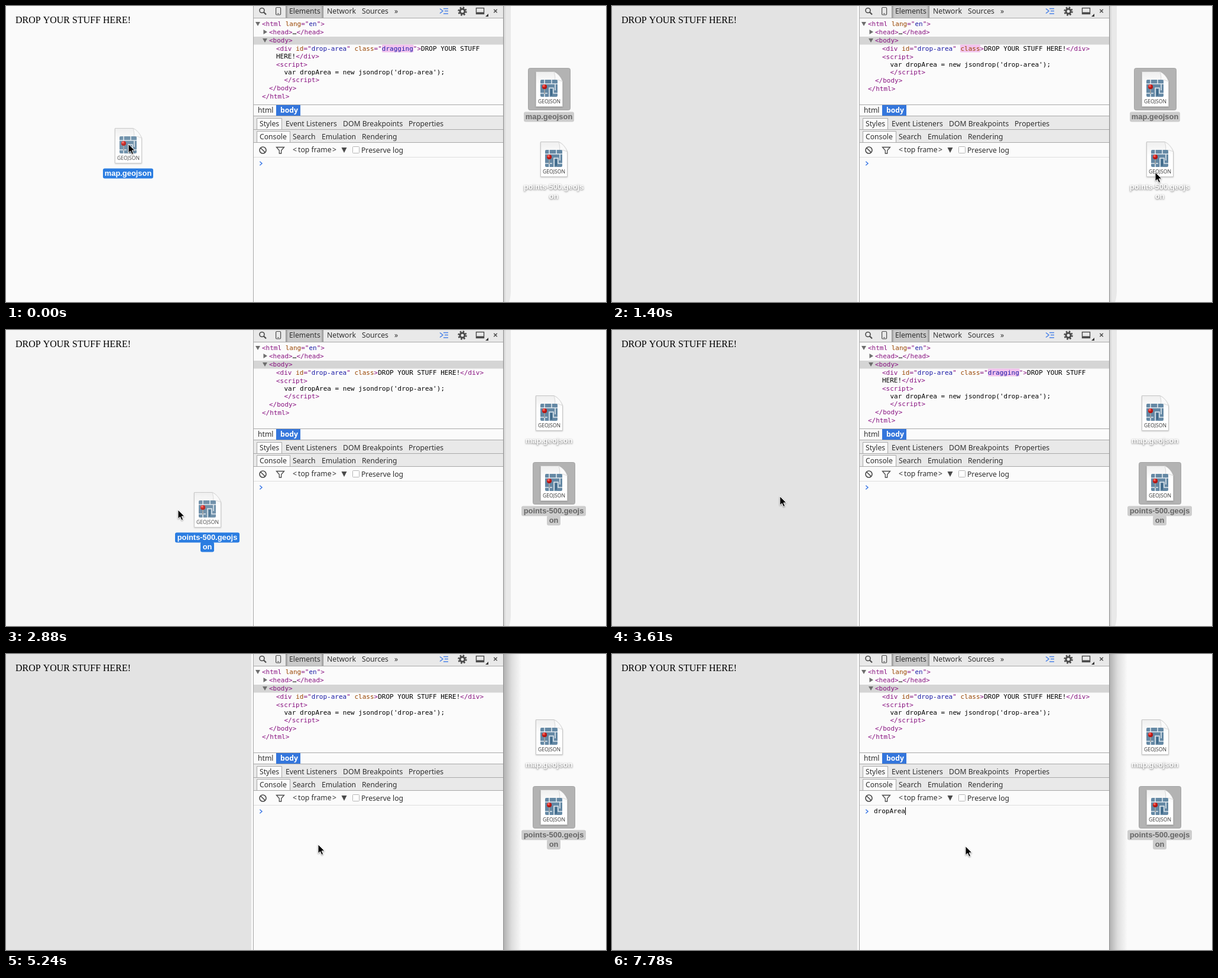
Recreate the animation shown at these times as an HTML page. Size 1015x502 px, loop 8 s.

```html
<!DOCTYPE html>
<html lang="en">
<head>
<meta charset="utf-8">
<title>Drop area demo</title>
<style>
html, body { margin: 0; width: 100%; height: 100%; overflow: hidden; background: #fafafa }
svg { display: block }
text { font: 12.2px "Noto Sans", sans-serif; fill: #303030; white-space: pre }
.code text { font: 11px "DejaVu Sans Mono", monospace; fill: #000 }
.code .tag { fill: #881280 }
.code .attr { fill: #994500 }
.code .val { fill: #1a1aa6 }
.label text { font: bold 12.9px "Liberation Sans", Arial, sans-serif; text-anchor: middle }
.on text { fill: #666 }
.on rect { fill: #cdcdcd }
.ghost text { fill: #fff }
.ghost rect { fill: #2b7de1 }
.off text { fill: #fff; filter: drop-shadow(0 1px 1.5px #0009) }
.off rect { display: none }
.pick { fill: #b3b3b3; stroke: #a3a3a3 }
.line { fill: none; stroke: #a8a8a8 }
.icon { fill: none; stroke: #4a4a4a; stroke-width: 1.6 }
</style>
</head>
<body>
<svg width="1015" height="502" viewBox="0 0 1015 502">
<defs>
  <linearGradient id="paper" x2="0" y2="1"><stop stop-color="#efefef"/><stop offset=".4" stop-color="#fff"/></linearGradient>
  <linearGradient id="tab"><stop stop-color="#929292"/><stop offset=".07" stop-color="#c9c9c9"/><stop offset=".93" stop-color="#c9c9c9"/><stop offset="1" stop-color="#929292"/></linearGradient>
  <linearGradient id="edge"><stop stop-color="#cfcfcf"/><stop offset="1" stop-color="#e9e9e9"/></linearGradient>
  <linearGradient id="deep"><stop stop-color="#b2b2b2"/><stop offset=".45" stop-color="#dedede"/><stop offset="1" stop-color="#fafafa"/></linearGradient>
  <radialGradient id="ball" cx=".35" cy=".3"><stop stop-color="#ff9a90"/><stop offset=".5" stop-color="#e02a24"/><stop offset="1" stop-color="#b01512"/></radialGradient>
  <g id="file">
    <path d="M-22.5-29.5H8Q16-26 22.5-13V29.5H-22.5Z" fill="url(#paper)" stroke="#c6c6c6" style="filter:drop-shadow(0 1px 1px #0003)"/>
    <path d="M8-29.5Q11-20 9-15Q16-17 22.5-13Q18-25 8-29.5Z" fill="#fafafa" stroke="#d0d0d0" stroke-width=".8"/>
    <rect x="-15" y="-16" width="29" height="29" rx="2" fill="#6488a4"/>
    <path d="M-15-9H14M-8-16V13M-15 7H-3M0 13V-2H7V7H14M4-16V-9M10-9V2" fill="none" stroke="#dfe8ee" stroke-width="1.6"/>
    <path d="M2 0H5V11H2Z" fill="#3f6a8b"/>
    <path d="M-8-1V8" stroke="#777" stroke-width="1.2"/>
    <circle cx="-8" cy="-4" r="4.1" fill="url(#ball)"/>
    <text y="24" text-anchor="middle" style="font-size:8.6px;font-weight:500;fill:#444">GEOJSON</text>
  </g>
</defs>

<rect width="1015" height="502" fill="#fafafa"/>
<rect id="page" width="415" height="502"/>
<text x="16" y="29" style="font:16px 'Liberation Serif','Times New Roman',serif;font-kerning:none;fill:#000">DROP YOUR STUFF HERE!</text>

<!-- window edge -->
<g id="thin"><path d="M842 0H854V485Q853 498 851 502H842Z" fill="#e9e9e9"/><rect x="842" width="4" height="502" fill="url(#edge)"/></g>
<rect id="wide" x="842" width="30" height="502" fill="url(#deep)"/>

<!-- developer panel -->
<rect x="418" width="424" height="502" fill="#fbfbfb"/>
<rect x="419" width="422" height="20" fill="#e9e9e9"/>
<rect x="473" width="64" height="20" fill="url(#tab)"/>
<rect x="419" y="187" width="422" height="45" fill="#e9e9e9"/>
<rect x="419" y="52" width="422" height="13.5" fill="#d5d5d5"/>
<path class="line" d="M418.5 0V502M419 20.5H841M419 167.5H841M419 186.5H841M419 209.5H841M419 231.5H841"/>
<path d="M419 256.5H841" stroke="#dedede"/>
<path d="M841.5 0V502" stroke="#8e8e8e"/>
<path d="M424.5 209V190.5H466.5V209M424.5 231V212.5H480.5V231" fill="#fbfbfb" stroke="#a8a8a8"/>
<rect x="457" y="168" width="41" height="18" fill="#3476dc"/>
<g id="labels"></g>
<text x="464" y="181" style="font-weight:bold;fill:#fff">body</text>

<g class="icon">
  <circle cx="433" cy="7.5" r="4"/><path d="M436 10.5L440 14.5" stroke-width="2.2"/>
  <rect x="456.6" y="2.5" width="8" height="12.5" rx="1.5" stroke-width="1.2"/><path d="M459 13H462" stroke-width="1"/>
  <path d="M734 4.5L739 8.5L734 12.5M740 4.5H748M742 8.5H748M740 13H748" stroke="#4b83e8"/>
  <circle cx="772" cy="9" r="4" stroke-width="3"/>
  <circle cx="772" cy="9" r="6.5" stroke-width="2.4" stroke-dasharray="2.6 2.5"/>
  <rect x="795.5" y="3.5" width="13" height="10" stroke-width="1.4"/><path d="M796 12H808" stroke-width="3"/>
  <path d="M816 13V18H811Z" fill="#333" stroke="none"/>
  <path d="M825.3 5.8L830.7 11.2M830.7 5.8L825.3 11.2" stroke-width="1.5"/>
  <circle cx="434.5" cy="244.5" r="5.5"/><path d="M430.7 240.7L438.3 248.3"/>
  <path d="M457.5 239.5H470.5L465.7 245V250H462.3V245Z" stroke-width="1.3"/>
  <path d="M567.5 240H576.5L572 249Z" fill="#4a4a4a" stroke="none"/>
  <rect x="586.5" y="238.5" width="11" height="11" rx="1" fill="#fff" stroke="#b5b5b5" stroke-width="1"/>
  <path d="M429.3 263.7L433 267L429.3 270.3" stroke="#3b78e7" stroke-width="1.5"/>
</g>
<path d="M422 27H430L426 34ZM434 55H442L438 62ZM435.5 40V48L442 44Z" fill="#6e6e6e"/>

<g class="code">
  <rect id="dragMark" x="636" y="65.5" width="53.5" height="13" rx="1" fill="#f3c3ee"/>
  <rect id="classMark" x="589" y="65.5" width="34" height="13" rx="1" fill="#f3c3ee"/>
  <text class="tag" x="433" y="34">&lt;html <tspan class="attr">lang</tspan>="<tspan class="val">en</tspan>"&gt;</text>
  <text class="tag" x="445" y="48">&lt;head&gt;<tspan fill="#000">…</tspan>&lt;/head&gt;</text>
  <text class="tag" x="445" y="62">&lt;body&gt;</text>
  <text class="tag" x="457" y="76">&lt;div <tspan class="attr">id</tspan>="<tspan class="val">drop-area</tspan>" <tspan class="attr">class</tspan><tspan id="value"></tspan>&gt;<tspan id="inner" fill="#000"></tspan><tspan id="close">&lt;/div&gt;</tspan></text>
  <text id="wrap" class="tag" x="457" y="89"><tspan fill="#000">HERE!</tspan>&lt;/div&gt;</text>
  <g id="rest">
    <text class="tag" x="457" y="103">&lt;script&gt;</text>
    <text x="470.5" y="116">var dropArea = new jsondrop('drop-area');</text>
    <text class="tag" x="470.5" y="129">&lt;/script&gt;</text>
    <text class="tag" x="445" y="143">&lt;/body&gt;</text>
    <text class="tag" x="433" y="157">&lt;/html&gt;</text>
  </g>
  <text x="443" y="270"><tspan id="typed"></tspan><tspan id="hint" fill="#a0a0a0"></tspan></text>
  <rect id="caret" y="260" width="1" height="13"/>
</g>

<!-- desktop files -->
<g transform="translate(919 141)">
  <rect id="mapPick" class="pick" x="-35.5" y="-35.5" width="71" height="71" rx="3"/>
  <use href="#file"/><g id="mapName"></g>
</g>
<g transform="translate(927 260)">
  <rect id="pointsPick" class="pick" x="-35.5" y="-35.5" width="71" height="71" rx="3"/>
  <use href="#file"/><g id="pointsName"></g>
</g>
<g id="ghost"><use href="#file" opacity=".9"/><g id="ghostMap" class="label ghost"></g><g id="ghostPoints" class="label ghost"></g></g>
<path id="cursor" d="M0 0V15.2L3.5 12L6 17.6L8.6 16.5L6.2 11H11Z" stroke="#fff" style="filter:drop-shadow(0 1px 1px #0006)"/>
</svg>
<script>
const $ = id => document.getElementById(id);
const show = (id, on) => $(id).style.display = on ? '' : 'none';
const place = (id, x, y) => $(id).setAttribute('transform', `translate(${x} ${y})`);
const clamp = v => Math.max(0, Math.min(1, v));

const labels = [
  [479, 13, 'Elements'], [543, 13, 'Network'], [602, 13, 'Sources'], [657, 13, '»'],
  [426, 181, 'html'], [429, 204, 'Styles'], [473, 204, 'Event Listeners'],
  [570, 204, 'DOM Breakpoints'], [681, 204, 'Properties'], [429, 226, 'Console'],
  [485, 226, 'Search'], [534, 226, 'Emulation'], [602, 226, 'Rendering'],
  [485, 248, '<'], [494, 248, 'top frame'], [552, 248, '>'], [601, 249, 'Preserve log']
];
for (const [x, y, s] of labels) {
  const el = document.createElementNS('http://www.w3.org/2000/svg', 'text');
  el.setAttribute('x', x);
  el.setAttribute('y', y);
  el.textContent = s;
  $('labels').append(el);
}

// file names, placed relative to the middle of the file icon
const plate = (x, y, w, s) =>
  `<rect x="${x}" y="${y}" width="${w}" height="17" rx="3"/><text x="-.5" y="${y + 12.5}">${s}</text>`;
const mapLabel = plate(-43, 38.5, 85, 'map.geojson');
const pointsLabel = plate(-55, 38.5, 109, 'points-500.geojs') + plate(-12, 54.5, 23, 'on');
$('mapName').innerHTML = $('ghostMap').innerHTML = mapLabel;
$('pointsName').innerHTML = $('ghostPoints').innerHTML = pointsLabel;

// time, x, y
const cursorPath = [
  [0, 207, 234], [410, 207, 234], [1097, 868, 296], [1247, 926, 303], [1395, 919, 282],
  [1690, 920, 262], [2427, 920, 262], [2722, 488, 326], [2870, 291, 305], [3017, 278, 292],
  [3460, 284, 282], [3755, 284, 282], [4640, 528, 323], [5837, 528, 323],
  [6136, 563, 346], [6434, 598, 326]
];
const ghostPath = [
  [2427, 927, 260], [2722, 566, 313], [2870, 341, 305], [3017, 291, 292], [3460, 284, 284]
];

function along(path, t) {
  const i = path.findIndex(p => p[0] > t);
  if (i < 0) return path[path.length - 1].slice(1);
  if (!i) return path[0].slice(1);
  const [a, b] = [path[i - 1], path[i]], k = (t - a[0]) / (b[0] - a[0]);
  return [1, 2].map(n => Math.round(a[n] + (b[n] - a[n]) * k));
}

// the screen refreshes about seven times a second
function tick(t) {
  const [from, step] = t < 1100 ? [0, 137.4] : t < 5085 ? [1100, 147.5] : [5090, 149.4];
  return from + Math.floor((t - from) / step + 0.01) * step;
}

const typing = [[6285, '', ''], [6434, 'd', ''], [6580, 'dr', ''], [6880, 'drop', ''],
  [7180, 'drop', 'Area'], [7480, 'dropA', ''], [7780, 'dropArea', '']];

function draw(t) {
  const q = tick(t);
  const second = t >= 2430;
  const dragging = t < 1100 || (t >= 3310 && t < 4490);
  const fade = start => clamp((start + 740 - q) / 350);

  const page = t < 280 ? '#fafafa' : t < 2870 ? '#e3e3e3' : t < 3015 ? '#f5f5f5' : t < 3610 ? '#fafafa' : '#e3e3e3';
  $('page').setAttribute('fill', page);

  $('value').innerHTML = dragging ? '="<tspan class="val">dragging</tspan>"' : '';
  $('inner').textContent = 'DROP YOUR STUFF' + (dragging ? '' : ' HERE!');
  show('close', !dragging);
  show('wrap', dragging);
  place('rest', 0, dragging ? 0 : -13);
  $('dragMark').style.opacity = dragging ? (second ? fade(3610) : 1) : 0;
  $('classMark').style.opacity = dragging ? 0 : fade(t < 3310 ? 1100 : 4490);

  show('thin', t < 4790);
  show('wide', t >= 4790);
  show('mapPick', !second);
  show('pointsPick', second);
  $('mapName').setAttribute('class', 'label ' + (second ? 'off' : 'on'));
  $('pointsName').setAttribute('class', 'label ' + (second ? 'on' : 'off'));

  show('ghost', t < 280 || (second && t < 3610));
  show('ghostMap', !second);
  show('ghostPoints', second);
  const spot = second ? along(ghostPath, q) : [207, 237];
  place('ghost', ...spot);
  $('ghost').style.opacity = spot[0] > 418 ? 0.86 : 1;
  place('cursor', ...along(cursorPath, q));

  const entry = typing.findLast(e => t >= e[0]);
  $('typed').textContent = entry ? entry[1] : '';
  $('hint').textContent = entry ? entry[2] : '';
  show('caret', entry);
  if (entry) $('caret').setAttribute('x', Math.floor(443 + entry[1].length * 6.63));
}

let start;
function loop(now) {
  start ??= now;
  draw((now - start) % 8000);
  requestAnimationFrame(loop);
}
draw(0);
requestAnimationFrame(loop);
</script>
</body>
</html>
```
